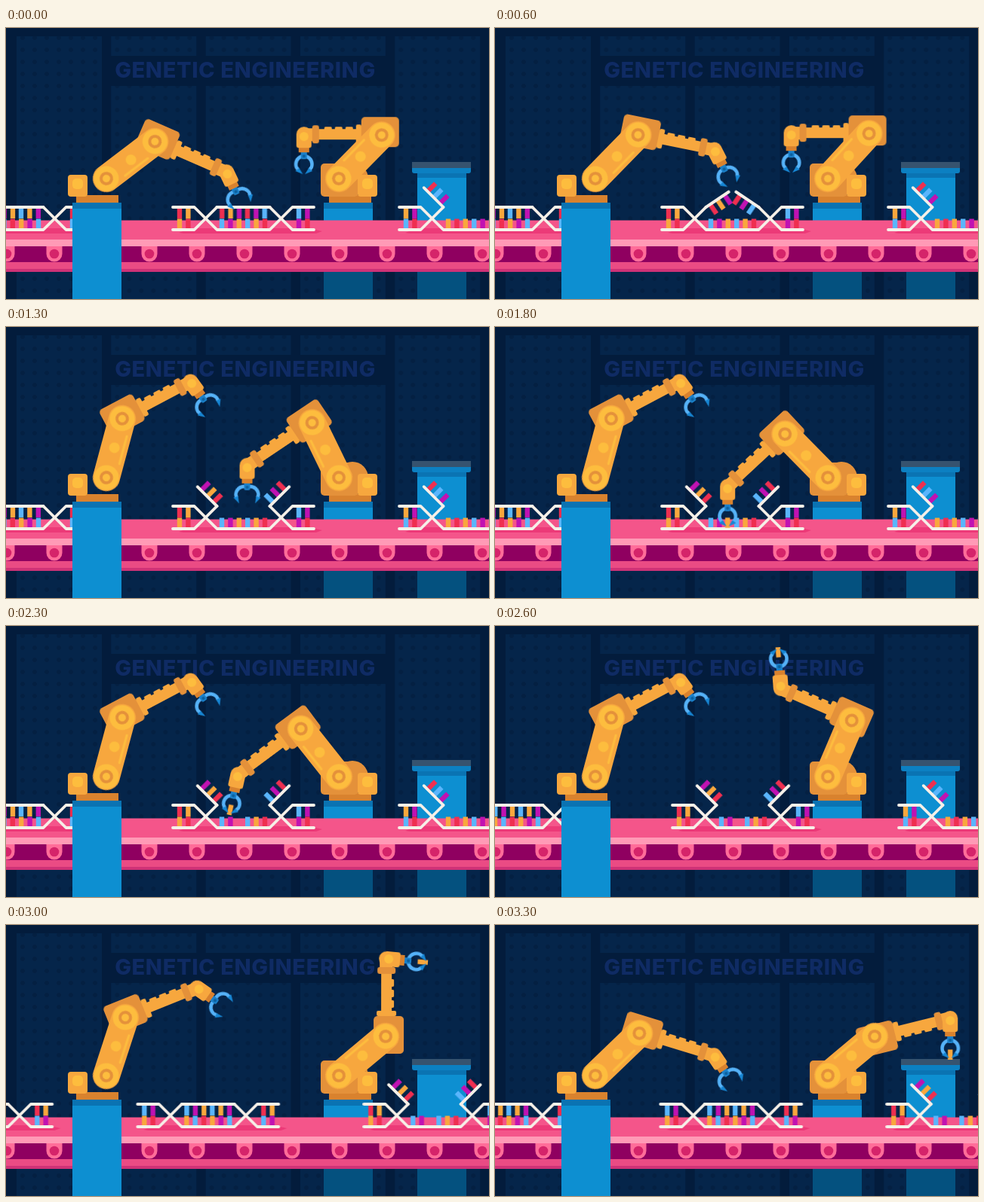
Recreate the animation shown at these times as an HTML page. Size 640 px wide and 360 px high, loop 3.4 s.

```html
<!DOCTYPE html>
<html lang="en">
<head>
<meta charset="utf-8">
<title>Genetic engineering</title>
<style>
:root {
  --in: cubic-bezier(.5, 0, .75, .75);
  --out: cubic-bezier(.2, .5, .5, 1);
  --mid: cubic-bezier(.3, .2, .7, .9);
}
html, body { margin: 0; width: 100%; height: 100%; overflow: hidden; background: #031c3c; }
svg { display: block; width: 100vw; height: 100vh; }
.title { font: 800 29px Inter, "Open Sans", sans-serif; letter-spacing: .6px; fill: #0f2b64; }
.strand { fill: none; stroke: #f6f0e8; stroke-width: 3.8; stroke-linecap: round; stroke-linejoin: round; }
.claw { fill: none; stroke: #55b2f8; stroke-width: 4.6; }

.belt, .l-up, .l-fore, .l-hand, .r-up, .r-fore, .r-hand, .l-jaw, .r-jaw, .flap, .held, .taken {
  animation: 3.4s linear infinite;
}
.belt { animation-name: belt; }
.l-up { animation-name: l-up; }
.l-fore { animation-name: l-fore; }
.l-hand { animation-name: l-hand; }
.r-up { animation-name: r-up; }
.r-fore { animation-name: r-fore; }
.r-hand { animation-name: r-hand; }
.l-jaw { animation-name: l-jaw; }
.r-jaw { animation-name: r-jaw; }
.flap { animation-name: flap; }
.held { animation-name: held; animation-timing-function: step-end; }
.taken { animation-name: taken; animation-timing-function: step-end; }

@keyframes belt {
  0%, 70.59% { transform: translateX(0); animation-timing-function: cubic-bezier(.64, 0, .21, 1); }
  100% { transform: translateX(300px); }
}
@keyframes flap {
  0%, 14.71% { transform: rotate(0deg); animation-timing-function: var(--in); }
  26.47% { transform: rotate(-82deg); animation-timing-function: var(--out); }
  36.76%, 100% { transform: rotate(-135deg); }
}

/* left robot */
@keyframes l-up {
  0% { transform: rotate(-37.4deg); animation-timing-function: ease-out; }
  5.88%, 14.71% { transform: rotate(-35deg); animation-timing-function: var(--in); }
  26.47% { transform: rotate(-61deg); animation-timing-function: var(--out); }
  36.76%, 79.41% { transform: rotate(-75deg); animation-timing-function: var(--in); }
  88.24% { transform: rotate(-72deg); animation-timing-function: var(--mid); }
  97.06% { transform: rotate(-44deg); }
  100% { transform: rotate(-37.4deg); }
}
@keyframes l-fore {
  0%, 14.71% { transform: rotate(61deg); animation-timing-function: var(--in); }
  26.47% { transform: rotate(52deg); animation-timing-function: var(--out); }
  36.76%, 79.41% { transform: rotate(47deg); animation-timing-function: var(--in); }
  88.24% { transform: rotate(50deg); animation-timing-function: var(--mid); }
  97.06%, 100% { transform: rotate(61deg); }
}
@keyframes l-hand {
  0% { transform: rotate(41deg); }
  5.88%, 14.71% { transform: rotate(40deg); animation-timing-function: var(--in); }
  26.47% { transform: rotate(68deg); animation-timing-function: var(--out); }
  36.76%, 79.41% { transform: rotate(82deg); animation-timing-function: var(--in); }
  88.24% { transform: rotate(57deg); animation-timing-function: var(--mid); }
  97.06% { transform: rotate(39deg); }
  100% { transform: rotate(41deg); }
}
@keyframes l-jaw {
  0%, 7.35%, 23.53%, 100% { transform: rotate(27deg); }
  11.76%, 16.18% { transform: rotate(10deg); }
}

/* right robot, angles in its mirrored space */
@keyframes r-up {
  0% { transform: rotate(-134.5deg); animation-timing-function: ease-out; }
  26.47% { transform: rotate(-132deg); animation-timing-function: var(--in); }
  38.24% { transform: rotate(-64.1deg); animation-timing-function: var(--out); }
  50%, 60.29% { transform: rotate(-45.5deg); animation-timing-function: var(--in); }
  67.65% { transform: rotate(-51.6deg); animation-timing-function: var(--mid); }
  76.47% { transform: rotate(-113deg); animation-timing-function: var(--out); }
  88.24%, 100% { transform: rotate(-140deg); }
}
@keyframes r-fore {
  0% { transform: rotate(134.5deg); animation-timing-function: ease-out; }
  26.47% { transform: rotate(132deg); animation-timing-function: var(--in); }
  38.24% { transform: rotate(98deg); animation-timing-function: var(--out); }
  50%, 60.29% { transform: rotate(88.5deg); animation-timing-function: var(--in); }
  67.65% { transform: rotate(88.3deg); animation-timing-function: var(--mid); }
  76.47% { transform: rotate(89.3deg); animation-timing-function: var(--in); }
  88.24% { transform: rotate(50deg); animation-timing-function: var(--out); }
  97.06%, 100% { transform: rotate(-26deg); }
}
@keyframes r-hand {
  0%, 26.47% { transform: rotate(90deg); animation-timing-function: var(--in); }
  38.24% { transform: rotate(56deg); animation-timing-function: var(--out); }
  50%, 60.29% { transform: rotate(47deg); animation-timing-function: var(--in); }
  67.65% { transform: rotate(41deg); animation-timing-function: var(--mid); }
  76.47% { transform: rotate(-62deg); animation-timing-function: var(--out); }
  88.24% { transform: rotate(-95deg); }
  97.06%, 100% { transform: rotate(-104deg); }
}
@keyframes r-jaw {
  0%, 26.47%, 52.94%, 100% { transform: rotate(1deg); }
  38.24%, 47.06% { transform: rotate(24deg); }
}
@keyframes held { 0% { opacity: 0; } 52.94%, 100% { opacity: 1; } }
@keyframes taken { 0% { opacity: 1; } 52.94%, 100% { opacity: 0; } }
</style>
</head>
<body>
<svg id="stage" viewBox="0 0 640 360">
  <defs>
    <pattern id="dots" x="0" y="5" width="16" height="16" patternUnits="userSpaceOnUse">
      <circle cx="8" cy="8" r="3" fill="#042042"/>
    </pattern>
  </defs>
</svg>
<script>
const INK = { R: '#ef2f50', O: '#f9a73d', B: '#5ab5fc', M: '#c012b2' };
const LIGHT = '#fdbd3e', MAIN = '#f7a73e', DARK = '#e4913a', DEEP = '#d9822e';
const UPPER = 81, FORE = 103;   // bone lengths
const HINGE = 58.5, SPAN = 187; // DNA piece

const rect = (x, y, w, h, fill, extra = '') =>
  `<rect x="${x}" y="${y}" width="${w}" height="${h}" fill="${fill}" ${extra}/>`;
const disc = (x, y, r, fill) => `<circle cx="${x}" cy="${y}" r="${r}" fill="${fill}"/>`;
const group = (x, y, body, extra = '') => `<g transform="translate(${x} ${y})${extra}">${body}</g>`;
const joint = (name, body) => `<g class="${name}">${body}</g>`;
const times = (n, fn) => Array.from({ length: n }, (_, i) => fn(i)).join('');

function wall() {
  const tile = (y, h) => rect(0, y, 113, h, '#05254a') + rect(0, y, 113, h, 'url(#dots)');
  const panels = times(5, i =>
    group(14 + 125.3 * i, 0, i % 4 ? tile(11, 26) + tile(77, 283) : tile(11, 349)));
  return panels + '<text class="title" x="317" y="66" text-anchor="middle">GENETIC ENGINEERING</text>';
}

function bin() {
  return rect(545, 192, 65, 168, '#0d8fd1') + rect(545, 192, 65, 7, '#0a74b3') +
    rect(538, 182, 78, 11, '#0c80c2', 'rx="3"') + rect(538, 178, 78, 8, '#36536f');
}

function pedestal(x) {
  return rect(x, 232, 65, 128, '#0d8fd1') + rect(x, 232, 65, 8, '#0a73b2');
}

function conveyor() {
  const roller = x => group(x, 300,
    '<path d="M-10.5 -10V0A10.5 10.5 0 0 0 10.5 0V-10Z" fill="#ff6d99"/>' + disc(0, 0, 6.3, '#d5246a'));
  return rect(0, 255.5, 640, 26, '#f4558a') + rect(0, 281, 640, 9, '#ff9ab6') +
    rect(0, 290, 640, 21, '#8f0060') + rect(0, 311, 640, 10, '#ea4b84') + rect(0, 320, 640, 4, '#cf3277') +
    times(11, i => roller(1 + 63 * i)) +
    rect(421, 324, 65, 36, '#04517f') + rect(545, 324, 65, 36, '#04517f');
}

const rungs = (inks, x, y) =>
  [...inks].map((k, i) => rect(x + 11.4 * i - 3.2, y, 6.4, 13.5, INK[k])).join('');

// One DNA piece: inks are end pairs (top, bottom) and the middle rows.
function strand(x, { left, right, top, bottom }, state) {
  const flap = inks => rungs(inks, 6.7, 1.5) + '<path class="strand" d="M0 0H36.5"/>';
  const turn = body => state === 'opening' ? joint('flap', body)
    : `<g transform="rotate(${state === 'open' ? -135 : 0})">${body}</g>`;
  const gap = state === 'opening' ? 'class="taken"' : '';
  const low = [...bottom].map((k, i) =>
    rect(61.8 + 11.4 * i, 253.5, 6.4, 13.5, INK[k], i === 2 ? gap : '')).join('');
  const ends = [[left, 9], [right, 167]].map(([[a, b], at]) =>
    rungs(a, at, 240) + rungs(b, at, 253.5)).join('');
  const half = `<path class="strand" d="M0 238H28.5L${HINGE} 268H${SPAN / 2}M0 268H28.5L${HINGE} 238"/>`;
  return group(x, 0,
    '<path d="M8 272L24 266H180L198 270L190 273H14Z" fill="#ec3a78"/>' + ends + low +
    group(HINGE, 238, turn(flap(top.slice(0, 3)))) +
    group(SPAN - HINGE, 238, turn(flap([...top.slice(3)].reverse().join(''))), ' scale(-1 1)') +
    half + group(SPAN, 0, half, ' scale(-1 1)'));
}

function strands() {
  const a = { left: ['BM', 'OR'], right: ['RO', 'BM'], top: 'BMOBOM', bottom: 'OBROMB' };
  const b = { left: ['RO', 'OR'], right: ['BM', 'MR'], top: 'ROMRMB', bottom: 'BMOBOR' };
  const c = { left: ['OM', 'BR'], right: ['RB', 'OM'], top: 'MBROBM', bottom: 'OROBMB' };
  return joint('belt', strand(-379, a) + strand(-79, a) + strand(221, b, 'opening') + strand(521, c, 'open'));
}

function bolt(x) {
  return disc(x, 0, 16.5, LIGHT) + disc(x, 0, 9, DARK) + disc(x, 0, 5, LIGHT);
}

function hand(side) {
  const jaw = joint(side + '-jaw',
    '<path class="claw" d="M0 0A10.5 10.5 0 0 0 10.5 10.5A10.5 10.5 0 0 0 18.5 7"/><path d="M16 6L24 1L20 11Z" fill="#1686d4"/>');
  const piece = side === 'r' ? joint('held', rect(41.5, -3.2, 13.5, 6.4, INK.O)) : '';
  return piece + group(29, 0, jaw + `<g transform="scale(1 -1)">${jaw}</g>`) +
    rect(22, -4, 11, 8, '#1a7fc8', 'rx="2"') + disc(29, 0, 2, '#0b5f9e') +
    rect(17, -7, 7, 14, DEEP) +
    '<path d="M0 -10A10 10 0 0 0 0 10H15Q18 10 18 7V-7Q18 -10 15 -10Z" fill="' + MAIN + '"/>' +
    disc(3, 0, 6, LIGHT);
}

function forearm(side) {
  return rect(-23, -24, 50, 40, DARK, 'rx="5"') +
    rect(27, -14, 7, 26, MAIN, 'rx="2"') +
    times(3, i => rect(38 + 14 * i, -11, 10, 5, MAIN, 'rx="1.5"')) +
    rect(33, -8, 52, 14, MAIN) +
    rect(90, -9, 12, 17, MAIN) + rect(83, -13, 9, 24, DARK, 'rx="3"') +
    group(FORE, -1, joint(side + '-hand', hand(side)));
}

function arm(side, x, mirror = '') {
  const upper = `<path d="M0 0H${UPPER}" stroke="${MAIN}" stroke-width="36" stroke-linecap="round"/>` +
    `<path d="M22 12H60" stroke="${LIGHT}" stroke-width="3" stroke-linecap="round"/>` +
    disc(41, 0, 7, LIGHT) + bolt(0) + bolt(UPPER);
  return group(x, 200,
    joint(side + '-up', group(UPPER, 0, joint(side + '-fore', forearm(side))) + upper), mirror);
}

function motor(x) {
  return rect(x, 195, 26, 29, MAIN, 'rx="4"') + rect(x + 6, 200, 14, 14, LIGHT, 'rx="5"');
}

const leftBase = pedestal(88) + rect(93, 222, 56, 10, DEEP) + motor(82);
const rightBase = pedestal(421) + rect(428, 222, 56, 10, DEEP) + disc(459, 200, 21, DARK) +
  rect(417, 180, 50, 44, DARK, 'rx="5"') + motor(466);

document.getElementById('stage').insertAdjacentHTML('beforeend',
  wall() + bin() + rightBase + conveyor() + strands() + leftBase +
  arm('r', 441, ' scale(-1 1)') + arm('l', 133));
</script>
</body>
</html>
```
